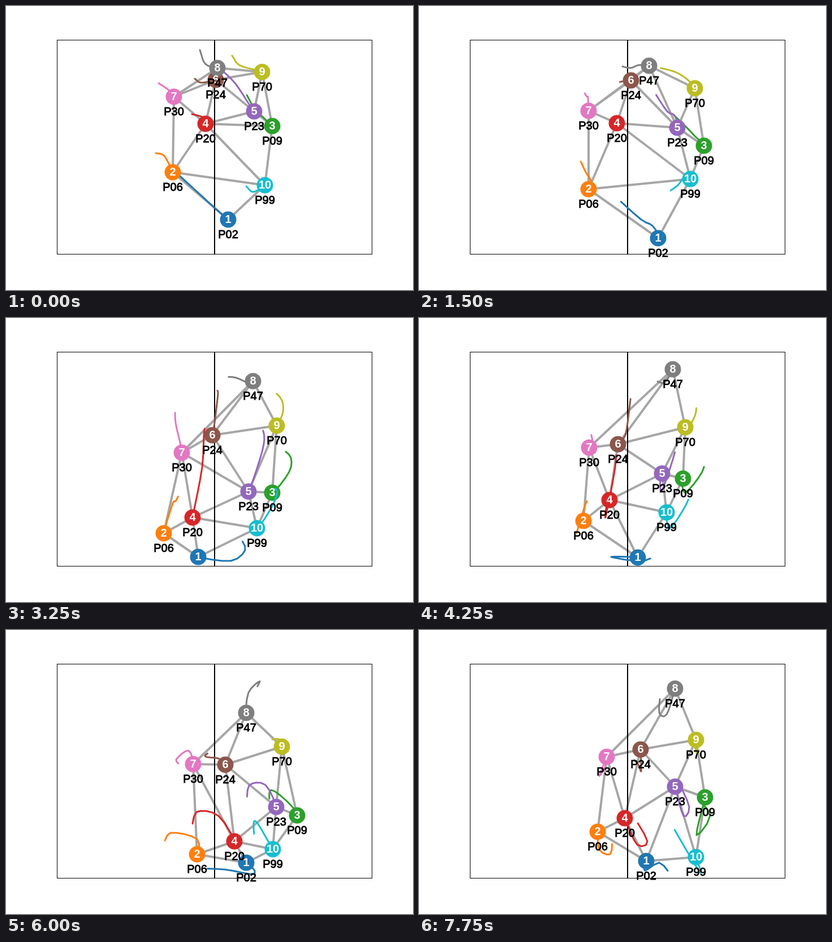
An HTML page with a canvas for the animation above (8000 ms loop, 720x504 px).

```html
<!DOCTYPE html>
<html lang="en">
<head>
<meta charset="utf-8">
<title>Formation graph</title>
<style>
html, body { margin: 0; width: 100%; height: 100%; overflow: hidden; background: #fff; }
canvas { display: block; }
</style>
</head>
<body>
<canvas id="stage" width="720" height="504"></canvas>
<script>
const ctx = document.getElementById("stage").getContext("2d");
const STEP = 250, STEPS = 32, TRAIL = 9, RADIUS = 14.5;
const COLORS = ["#1f77b4", "#ff7f0e", "#2ca02c", "#d62728", "#9467bd",
                "#8c564b", "#e377c2", "#7f7f7f", "#bcbd22", "#17becf"];
const FIELD = { x: 90.5, y: 60.5, w: 557, h: 380, middle: 369 };
const BOTTOM = FIELD.y + FIELD.h;

// Steps at which every player passes a waypoint; negative ones only feed trails.
const TIMES = [-9, -5, 0, 3, 6, 9, 13, 17, 21, 24, 27, 31];

const player = (label, role, ...path) => ({ label, role, path });
const players = [
  player("P02", 1, [295, 290], [333, 325], [393, 379], [413, 390], [423, 412], [398, 431],
    [340, 424], [387, 425], [440, 433], [425, 413], [400, 427], [402, 410]),
  player("P06", 2, [265, 261], [280, 266], [295, 295], [305, 312], [300, 325], [295, 329],
    [279, 382], [291, 360], [338, 371], [338, 398], [319, 390], [316, 358]),
  player("P09", 3, [426, 158], [440, 182], [471, 213], [489, 232], [504, 248], [501, 273],
    [471, 310], [467, 285], [487, 295], [515, 329], [491, 364], [506, 297]),
  player("P20", 4, [329, 192], [347, 197], [353, 209], [352, 196], [350, 208], [347, 265],
    [330, 354], [337, 323], [376, 330], [404, 375], [386, 381], [364, 334]),
  player("P23", 5, [380, 112], [406, 138], [439, 187], [452, 194], [457, 216], [449, 251],
    [429, 308], [430, 276], [459, 275], [478, 314], [468, 330], [453, 278]),
  player("P24", 6, [334, 129], [345, 136], [371, 131], [373, 129], [375, 132], [373, 153],
    [365, 208], [352, 224], [376, 228], [388, 239], [393, 251], [392, 212]),
  player("P30", 7, [270, 137], [289, 150], [297, 161], [299, 162], [300, 186], [307, 217],
    [311, 239], [301, 230], [323, 214], [331, 238], [319, 259], [332, 225]),
  player("P47", 8, [343, 78], [352, 102], [374, 110], [388, 105], [407, 106], [428, 115],
    [437, 112], [449, 91], [429, 111], [425, 147], [438, 150], [453, 104]),
  player("P70", 9, [400, 88], [413, 105], [453, 117], [473, 129], [488, 146], [490, 167],
    [479, 191], [471, 194], [483, 194], [488, 207], [491, 218], [490, 195]),
  player("P99", 10, [425, 320], [437, 330], [458, 318], [469, 304], [480, 307], [472, 332],
    [444, 373], [438, 345], [445, 343], [472, 389], [498, 431], [490, 403])
];

// Four players trade roles for a moment.
const SWAP = { from: 20, to: 23, roles: { P02: 10, P06: 1, P20: 2, P99: 4 } };

function roleAt({ label, role }, step) {
  const swapped = step >= SWAP.from && step <= SWAP.to;
  return (swapped && SWAP.roles[label]) || role;
}

// Cubic Hermite curve through the waypoints.
function positionAt({ path }, step) {
  const last = TIMES.length - 1;
  let i = 0;
  while (i < last - 1 && TIMES[i + 1] <= step) i++;
  const span = TIMES[i + 1] - TIMES[i], u = (step - TIMES[i]) / span;
  const slope = (n, axis) => {
    const a = Math.max(n - 1, 0), b = Math.min(n + 1, last);
    return (path[b][axis] - path[a][axis]) / (TIMES[b] - TIMES[a]) * span;
  };
  const along = axis =>
    (1 + 2 * u) * (1 - u) ** 2 * path[i][axis] + u * (1 - u) ** 2 * slope(i, axis) +
    u * u * (3 - 2 * u) * path[i + 1][axis] + u * u * (u - 1) * slope(i + 1, axis);
  return { x: along(0), y: along(1) };
}

function circumcircle(a, b, c) {
  const bx = b.x - a.x, by = b.y - a.y, cx = c.x - a.x, cy = c.y - a.y;
  const d = 2 * (bx * cy - by * cx);
  if (Math.abs(d) < 1e-6) return null;
  const b2 = bx * bx + by * by, c2 = cx * cx + cy * cy;
  const x = (cy * b2 - by * c2) / d, y = (bx * c2 - cx * b2) / d;
  return { x: a.x + x, y: a.y + y, r: Math.hypot(x, y) };
}

// Delaunay edges: sides of every triangle whose circumcircle is empty.
function delaunay(pts) {
  const edges = new Map(), n = pts.length;
  for (let i = 0; i < n; i++)
    for (let j = i + 1; j < n; j++)
      for (let k = j + 1; k < n; k++) {
        const o = circumcircle(pts[i], pts[j], pts[k]);
        if (!o) continue;
        const empty = pts.every((p, m) => m === i || m === j || m === k ||
          Math.hypot(p.x - o.x, p.y - o.y) >= o.r);
        if (empty)
          for (const [s, e] of [[i, j], [j, k], [i, k]]) edges.set(s * n + e, [pts[s], pts[e]]);
      }
  return edges.values();
}

function polyline(points, color, width) {
  ctx.beginPath();
  points.forEach(p => ctx.lineTo(p.x, p.y));
  ctx.strokeStyle = color;
  ctx.lineWidth = width;
  ctx.stroke();
}

function drawText(text, x, y, weight, color, outline) {
  ctx.font = `${weight} 20px "Liberation Sans", Arial, sans-serif`;
  ctx.fillStyle = ctx.strokeStyle = color;
  ctx.lineWidth = outline;
  ctx.fillText(text, x, y);
  if (outline) ctx.strokeText(text, x, y);
}

function drawPlayer({ x, y, role, player }, step) {
  const color = COLORS[role - 1];
  const trail = Array.from({ length: TRAIL + 1 }, (_, i) => positionAt(player, step - TRAIL + i));
  polyline(trail, color, 3);
  ctx.fillStyle = color;
  ctx.beginPath();
  ctx.arc(x, y, RADIUS, 0, 2 * Math.PI);
  ctx.fill();
}

function draw(step) {
  ctx.fillStyle = "#fff";
  ctx.fillRect(0, 0, 720, 504);
  ctx.lineJoin = ctx.lineCap = "round";
  ctx.textAlign = "center";

  const nodes = players
    .map(p => ({ ...positionAt(p, step), player: p, role: roleAt(p, step) }))
    .sort((a, b) => a.role - b.role);

  ctx.save();
  ctx.beginPath();
  ctx.rect(FIELD.x, FIELD.y, FIELD.w, FIELD.h);
  ctx.clip();
  for (const edge of delaunay(nodes)) polyline(edge, "#a6a6a6", 4);
  polyline([{ x: FIELD.middle, y: FIELD.y }, { x: FIELD.middle, y: BOTTOM }], "#000", 2);
  for (const node of nodes) drawPlayer(node, step);
  for (const { x, y, role } of nodes) drawText(role, x, y + 6, "bold", "#fff", 0);
  ctx.restore();

  ctx.lineJoin = "miter";
  ctx.strokeStyle = "#000";
  ctx.lineWidth = 1;
  ctx.strokeRect(FIELD.x, FIELD.y, FIELD.w, FIELD.h);

  // A label may overhang the border, but vanishes once its centre is outside.
  for (const { x, y, player } of nodes)
    if (y + 25 < BOTTOM) drawText(player.label, x, y + 32.5, "normal", "#000", 0.9);
}

function tick() {
  draw(Math.floor(performance.now() / STEP) % STEPS);
  requestAnimationFrame(tick);
}
tick();
</script>
</body>
</html>
```
